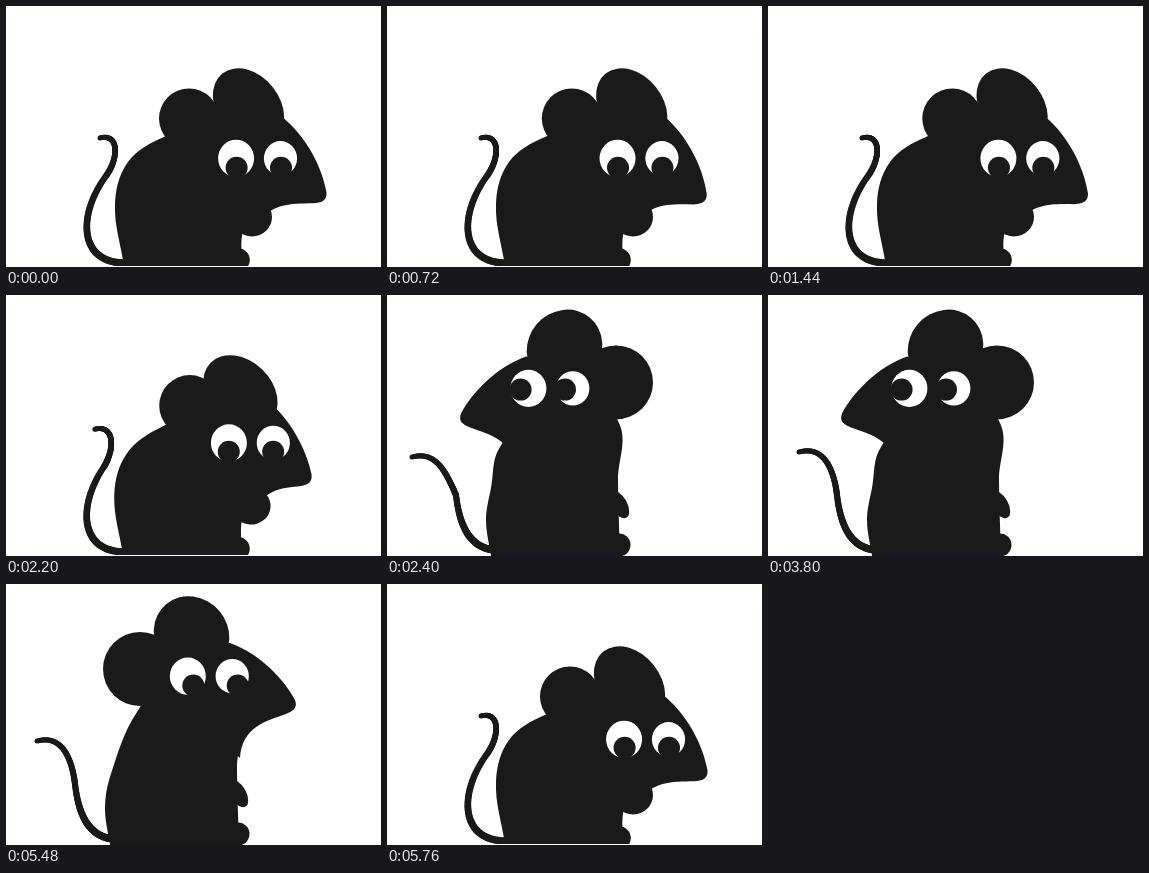
Write an HTML page with a canvas that moves like this. It is 375x261 px and loops after 5.8 s.

```html
<!DOCTYPE html>
<html lang="en">
<head>
<meta charset="utf-8">
<title>Mouse</title>
<style>
  html, body { margin: 0; width: 100%; height: 100%; overflow: hidden; background: #fff; }
  canvas { display: block; }
</style>
</head>
<body>
<canvas id="stage" width="375" height="261"></canvas>
<script>
const ctx = document.getElementById('stage').getContext('2d');
const LOOP = 5800, STEP = 40, SNIFF = 305, INK = '#1a1a1a';

// Snout facing right, measured from the forehead.
const snout = new Path2D('M-30 5L0 0C30 11 54 36 65 57C68 65 63 68 56 71C36 78 12 84 10 115L-40 75Z');

// turn: 1 faces right, -1 left. Ears and paw: x, y, rx, ry, angle.
const crouch = {
  turn: 1, nod: 0.314, size: 1.03, ground: 260,
  brow: [275, 110],
  farEar: [183, 112.5, 30, 30, 0],
  nearEar: [242.5, 100.5, 42, 31, 0.9],
  eyes: [252.3, 152.3],
  gaze: [0.5, 9.5],
  paw: [246, 211, 20, 19.5, 0],
  foot: [232, 254, 11.8, 11.8],
  torso: [[118, 260], [109, 198], [122, 156], [158, 131], [240, 105], [262, 165], [237, 225], [236, 260]],
  tail: [[94, 132], [112, 127], [114, 150], [100, 170], [72, 208], [72, 256], [118, 257]]
};

// Upright mouse; the head mirrors around the body's axis.
function stand(turn, gaze) {
  const drop = 1.2 * (1 - turn);
  const at = (dx, y) => [181.5 + turn * dx, y + drop];
  return {
    turn, gaze, nod: 0, size: 1, ground: 261,
    brow: at(42.5, 59),
    farEar: [...at(-47.5, 85), 37, 37, 0],
    nearEar: [...at(4, 50.5), 39.5, 36.5, 0.87 * turn],
    eyes: [183.8 + 20.2 * turn, 92.2 + drop / 2],
    paw: [232, 209.5, 15, 8, 1.05],
    foot: [232, 250, 11.5, 11.5],
    torso: [[104, 261], [99, 225], [104, 193], [122 + 9 * turn, 140 - 12 * turn],
      [180, 80], [232, 128], [231, 185], [233, 261]],
    tail: [[31, 157], [56, 150], [66, 175], [69, 200], [73, 235], [85, 253], [108, 255]]
  };
}

const left = stand(-1, [-7.8, 1.2]);
const right = stand(1, [6, 1.5]);

const ease = (t, a, b) => {
  const v = Math.max(0, Math.min(1, (t - a) / (b - a)));
  return v * v * (3 - 2 * v);
};

// Blends numbers, lists and whole poses alike.
function mix(a, b, p) {
  if (typeof a === 'number') return a + (b - a) * p;
  if (Array.isArray(a)) return a.map((v, i) => mix(v, b[i], p));
  return Object.fromEntries(Object.keys(a).map(k => [k, mix(a[k], b[k], p)]));
}

// Leans the crouching head around its neck.
function lean(pose, s) {
  const shift = ([x, y, ...rest]) => [x + 0.042 * s * (165 - y), y, ...rest];
  const out = { ...pose, nod: pose.nod + 0.042 * s };
  for (const key of ['brow', 'farEar', 'nearEar', 'eyes']) out[key] = shift(pose[key]);
  return out;
}

function swingTail(pose, s) {
  const tail = pose.tail.map(([x, y], i) => i < 3 ? [x - 6 * s, y + 5 * s] : [x, y]);
  return { ...pose, tail };
}

function poseAt(t) {
  if (t < 5 * SNIFF) return lean(crouch, (1 - Math.cos(t / SNIFF * 2 * Math.PI)) / 2);
  const lifted = lean(crouch, -1.3 * ease(t, 5 * SNIFF, 1680));
  if (t < 2200) return lifted;
  if (t <= 2400) return mix(lifted, swingTail(left, 1), ease(t, 2160, 2400));
  if (t < 2960) return swingTail(left, 1 - ease(t, 2400, 2520));
  if (t < 3800) return { ...left, gaze: [-7.8, 2.7] };
  if (t < 4760) return mix(left, right, ease(t, 3840, 4080));
  if (t < 5480) return { ...right, gaze: [-0.5, -0.5] };
  const p = ease(t, 5600, 5760);
  const pose = mix({ ...right, gaze: [5.5, 9.3] }, crouch, p);
  pose.eyes = mix(pose.eyes, [259.3, 155.3], p);
  pose.gaze[1] -= p;
  return pose;
}

function oval(x, y, rx, ry, angle = 0) {
  ctx.beginPath();
  ctx.ellipse(x, y, rx, ry, angle, 0, 2 * Math.PI);
  ctx.fill();
}

// Smooth line through the points, closed straight along the ground.
function drawTorso(pts) {
  const last = pts.length - 1;
  const dir = i => {
    const a = pts[Math.max(0, i - 1)], b = pts[Math.min(last, i + 1)];
    const d = Math.hypot(b[0] - a[0], b[1] - a[1]);
    return [(b[0] - a[0]) / d, (b[1] - a[1]) / d];
  };
  ctx.beginPath();
  ctx.moveTo(...pts[0]);
  for (let i = 0; i < last; i++) {
    const a = pts[i], b = pts[i + 1], u = dir(i), v = dir(i + 1);
    const h = Math.hypot(b[0] - a[0], b[1] - a[1]) * 0.35;
    ctx.bezierCurveTo(a[0] + u[0] * h, a[1] + u[1] * h, b[0] - v[0] * h, b[1] - v[1] * h, ...b);
  }
  ctx.fill();
}

function bezier(pts, u) {
  while (pts.length > 1) pts = pts.slice(1).map((b, i) => mix(pts[i], b, u));
  return pts[0];
}

// Two joined curves that thicken toward the body.
function drawTail(pts) {
  const n = 60;
  for (let i = 0; i <= 2 * n; i++) {
    const half = i < n ? 0 : 1;
    const [x, y] = bezier(pts.slice(3 * half, 3 * half + 4), i / n - half);
    const r = 2.5 + 1.2 * i / (2 * n);
    oval(x, y, r, r);
  }
}

function drawSnout({ brow, turn, nod, size }) {
  ctx.save();
  ctx.translate(...brow);
  ctx.scale(turn * size, size);
  ctx.rotate(nod);
  ctx.fill(snout);
  ctx.restore();
}

function drawEyes([x, y], [gx, gy]) {
  for (const side of [-1, 1]) {
    const ex = x + 22.2 * side, r = 17.3 - 0.7 * side;
    ctx.fillStyle = '#fff';
    oval(ex, y, r, r + 0.6);
    ctx.fillStyle = INK;
    oval(ex + gx, y + gy, 11, 11);
  }
}

function draw(pose) {
  ctx.fillStyle = '#fff';
  ctx.fillRect(0, 0, 375, 261);
  ctx.save();
  ctx.beginPath();
  ctx.rect(0, 0, 375, pose.ground);
  ctx.clip();
  ctx.fillStyle = INK;
  drawTail(pose.tail);
  drawTorso(pose.torso);
  drawSnout(pose);
  for (const part of ['farEar', 'nearEar', 'paw', 'foot']) oval(...pose[part]);
  drawEyes(pose.eyes, pose.gaze);
  ctx.restore();
}

const start = performance.now();
function tick() {
  const t = (performance.now() - start) % LOOP;
  draw(poseAt(Math.floor(t / STEP) * STEP));
  requestAnimationFrame(tick);
}
tick();
</script>
</body>
</html>
```
